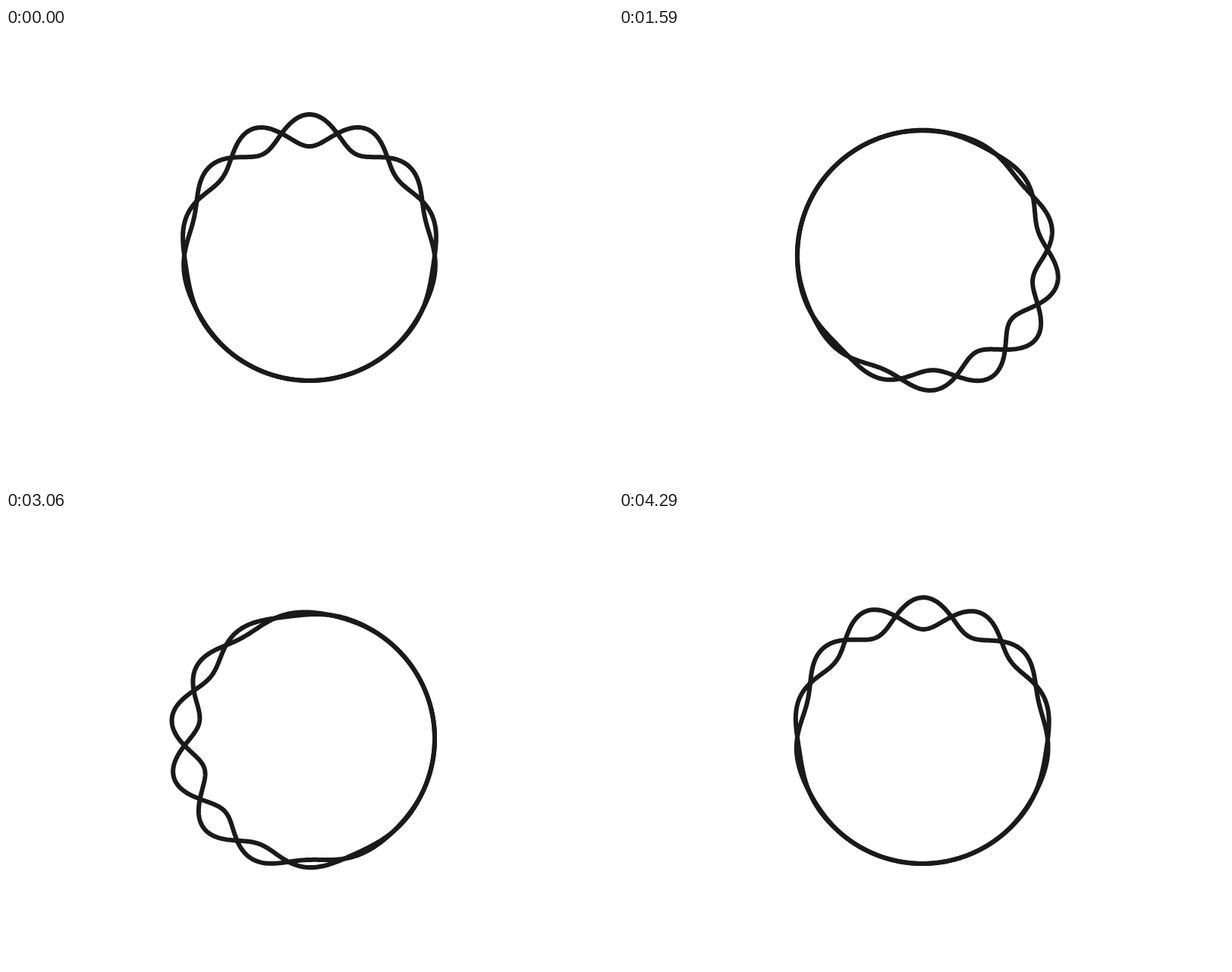
An HTML page for the animation above (4320 ms loop, 800 by 600 pixels).

```html
<!DOCTYPE html>
<html lang="en">
<head>
<meta charset="utf-8">
<title>Braided ring</title>
<style>
  html, body { margin: 0; width: 100%; height: 100%; overflow: hidden; background: #fff; }
  svg { display: block; }
  path { fill: none; stroke: #1a1a1a; stroke-width: 6; stroke-linejoin: round; }
</style>
</head>
<body>
<svg width="800" height="600" viewBox="0 0 800 600">
  <path id="outer"/>
  <path id="inner"/>
</svg>
<script>
const LOOP = 4320;
const CX = 400, CY = 300, RADIUS = 165;
const HEIGHT = 21, SPREAD = 0.8, WAVES = 7;
const STEPS = 720, TAU = Math.PI * 2;
const outer = document.getElementById('outer');
const inner = document.getElementById('inner');

// Angles run clockwise from the top; the swell circles the ring once per loop.
function strand(progress, side) {
  const center = progress * TAU;
  const phase = progress * 3 * Math.PI;
  let d = '';
  for (let i = 0; i < STEPS; i++) {
    const a = i / STEPS * TAU;
    const gap = Math.abs(a - center);
    const dist = Math.min(gap, TAU - gap);
    const swell = HEIGHT * Math.exp(-dist * dist / (2 * SPREAD * SPREAD));
    const r = RADIUS + side * swell * Math.cos(WAVES * a + phase);
    const x = CX + r * Math.sin(a);
    const y = CY - r * Math.cos(a);
    d += (i ? 'L' : 'M') + x.toFixed(2) + ' ' + y.toFixed(2);
  }
  return d + 'Z';
}

function draw() {
  const progress = performance.now() % LOOP / LOOP;
  outer.setAttribute('d', strand(progress, 1));
  inner.setAttribute('d', strand(progress, -1));
  requestAnimationFrame(draw);
}
draw();
</script>
</body>
</html>
```
